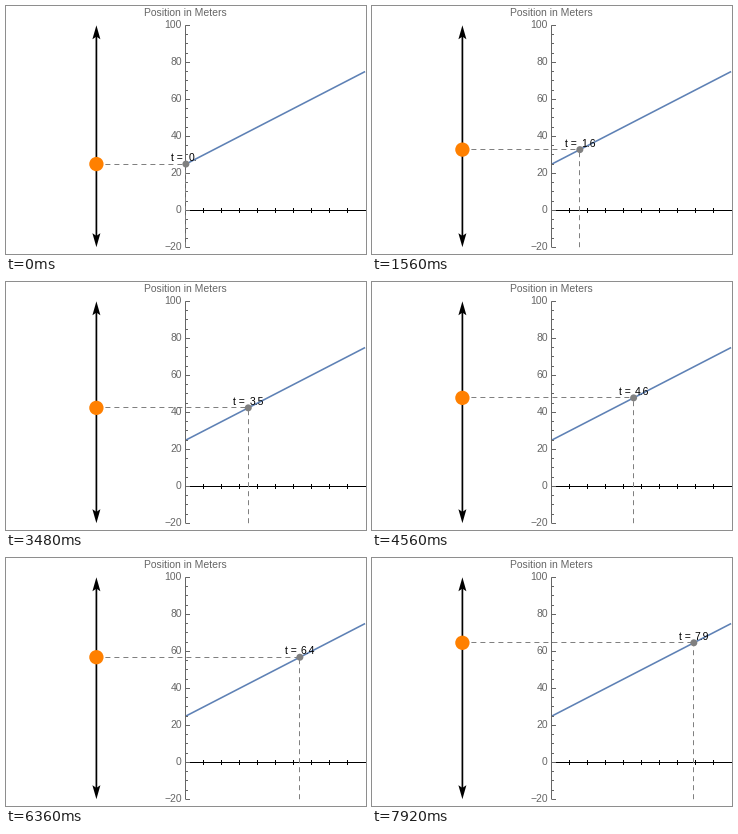
Write a matplotlib script that moves like this. It is 360x248 px and loops after 8 s.

```python
import math

import matplotlib.pyplot as plt
from matplotlib.animation import FuncAnimation
from matplotlib.patches import Circle, Polygon

W, H, DPI = 360, 248, 100
PT = 72 / DPI                      # points per pixel
OX, OY = 179.9, 204.3              # plot origin in pixels
SX, SY = 17.92, 1.85               # pixels per second, per meter
TRACK_X, TOP, BOTTOM = 90.4, 19.3, 241.2
STEP = 0.12                        # seconds between poses
FONT = 10.4
GRAY, LABEL, BLUE, ORANGE = "#808080", "#666666", "#5e81b5", "#ff8000"

plt.rcParams["font.family"] = "Liberation Sans"

fig = plt.figure(figsize=(W / DPI, H / DPI), dpi=DPI, facecolor="white")
ax = fig.add_axes([0, 0, 1, 1])
ax.set_xlim(0, W)
ax.set_ylim(H, 0)
ax.axis("off")


def px(t):
    return OX + SX * t


def py(pos):
    return OY - SY * pos


def crisp(v):
    """Centre of the pixel that holds v."""
    return math.floor(v) + 0.5


def position(t):
    return 25 + 5 * t


def line(xs, ys, color, width=1.0, z=2, **kw):
    return ax.plot(xs, ys, color=color, lw=width * PT, zorder=z, snap=False,
                   solid_capstyle="butt", **kw)[0]


def text(x, y, s, color, ha="left"):
    return ax.text(x, y, s, fontsize=FONT * PT, color=color, ha=ha,
                   va="baseline", zorder=8)


def arrow_head(tip, direction):
    pts = [(TRACK_X, tip),
           (TRACK_X - 4, tip + 14 * direction),
           (TRACK_X, tip + 11.3 * direction),
           (TRACK_X + 4, tip + 14 * direction)]
    ax.add_patch(Polygon(pts, closed=True, fc="black", ec="none", zorder=3))


def draw_axes():
    x0, y0 = crisp(OX), crisp(OY)
    line([x0, W], [y0, y0], "black", z=3)
    for i in range(1, 10):
        line([crisp(px(i))] * 2, [y0 - 2.5, y0 + 2.5], "black", z=3)

    line([x0, x0], [TOP, BOTTOM], LABEL, z=3)
    for v in range(-20, 101, 5):
        major = v % 20 == 0
        line([x0, x0 + (4.5 if major else 2.5)], [crisp(py(v))] * 2,
             LABEL, z=3)
        if major:
            text(175.8, py(v) + 2.8, str(v).replace("-", "\u2212"),
                 LABEL, "right")
    text(179.3, 10, "Position in Meters", LABEL, "center")


draw_axes()
line([px(0), px(10)], [py(position(0)), py(position(10))], BLUE, 1.6)
line([TRACK_X] * 2, [TOP + 10, BOTTOM - 10], "black", 1.7)
arrow_head(TOP, 1)
arrow_head(BOTTOM, -1)

dashes = dict(dashes=(5, 4), dash_capstyle="butt")
across = line([], [], GRAY, z=4, **dashes)
down = line([], [], GRAY, z=4, **dashes)
ball = ax.add_patch(Circle((TRACK_X, 0), 7.15, fc=ORANGE, ec="none", zorder=5))
dot = ax.add_patch(Circle((0, 0), 3.5, fc=GRAY, ec="none", zorder=5))
prefix = text(0, 0, "t =", "black")
number = text(0, 0, "", "black")


def update(n):
    t = (n // 3) * STEP
    x, y = px(t), py(position(t))
    across.set_data([TRACK_X, x], [crisp(y)] * 2)
    down.set_data([crisp(x)] * 2, [BOTTOM, y])
    ball.center = (TRACK_X, y)
    dot.center = (x, y)
    value = f"{t:.1f}".removesuffix("0")
    prefix.set_position((x - 15, y - 2.8))
    number.set_position((x + (1 if len(value) > 2 else 3), y - 2.8))
    number.set_text(value)
    return across, down, ball, dot, prefix, number


anim = FuncAnimation(fig, update, frames=200, interval=40,
                     repeat=True, repeat_delay=0, blit=False)
plt.show()
```
